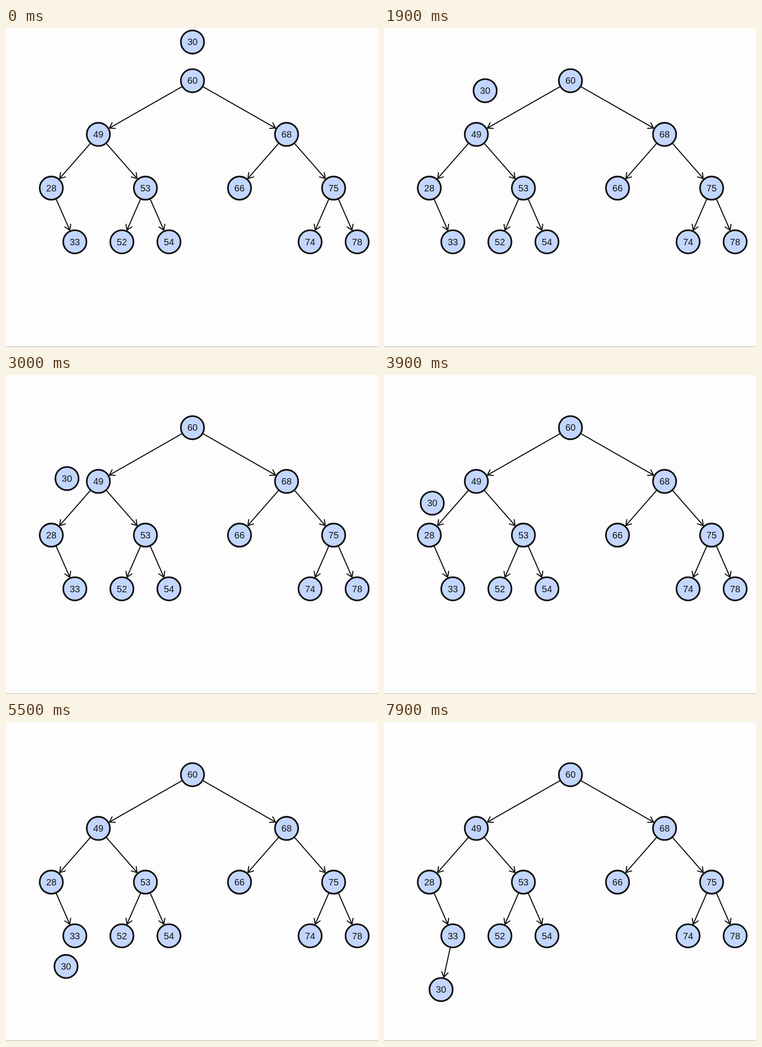
Write an HTML page with a canvas that moves like this. It is 808 px wide and 693 px high and loops after 8000 ms.

```html
<!DOCTYPE html>
<html lang="en">
<head>
<meta charset="utf-8">
<title>Tree insertion</title>
<style>
  html, body { margin: 0; width: 100%; height: 100%; overflow: hidden; background: #fdfdfd; }
  canvas { display: block; }
</style>
</head>
<body>
<canvas id="stage" width="808" height="693"></canvas>
<script>
const ctx = document.getElementById('stage').getContext('2d');
const INK = '#131313', FILL = '#c3d6fe', FONT = '"Liberation Sans", Arial, sans-serif';
const RADIUS = 25.2, LOOP = 8000, TICK = 100, MOVE = 600, LIFT = 84;

// Tree cells: column offset from the root and depth
const at = (col, depth) => ({ x: 405 + col * 51.1, y: 114.4 + depth * 116.7 });
const nodes = {
  60: at(0, 0), 49: at(-4, 1), 68: at(4, 1),
  28: at(-6, 2), 53: at(-2, 2), 66: at(2, 2), 75: at(6, 2),
  33: at(-5, 3), 52: at(-3, 3), 54: at(-1, 3), 74: at(5, 3), 78: at(7, 3)
};
const edges = [[60, 49], [60, 68], [49, 28], [49, 53], [68, 66], [68, 75],
  [28, 33], [53, 52], [53, 54], [75, 74], [75, 78]];

const key = 30, leaf = at(-5.5, 4);
const visits = [60, 49, 28, 33];
const starts = [1356, 2600, 3825, 5050];
const linkTime = 5750;
const above = p => ({ x: p.x, y: p.y - LIFT });
const stops = [...visits.map(v => above(nodes[v])), leaf];

function text(str, x, y, size) {
  ctx.font = size + 'px ' + FONT;
  ctx.textAlign = 'center';
  ctx.fillStyle = INK;
  ctx.fillText(str, x, y);
}

function drawNode(value, { x, y }) {
  ctx.beginPath();
  ctx.arc(x, y, RADIUS, 0, Math.PI * 2);
  ctx.fillStyle = FILL;
  ctx.fill();
  ctx.lineWidth = 3.6;
  ctx.stroke();
  text(value, x, y + 7, 20);
}

function drawEdge(a, b) {
  const back = Math.atan2(a.y - b.y, a.x - b.x);
  const polar = (p, r, angle) => [p.x + r * Math.cos(angle), p.y + r * Math.sin(angle)];
  const [x, y] = polar(b, 27.5, back), tip = { x, y };
  ctx.lineWidth = 2.3;
  ctx.beginPath();
  ctx.moveTo(a.x, a.y);
  ctx.lineTo(x, y);
  ctx.moveTo(...polar(tip, 13, back - 0.57));
  ctx.lineTo(x, y);
  ctx.lineTo(...polar(tip, 13, back + 0.57));
  ctx.stroke();
}

function drawSign(sign, { x, y }) {
  ctx.beginPath();
  ctx.roundRect(x - 8, y - 8, 16, 16, 3);
  ctx.fillStyle = FILL;
  ctx.fill();
  ctx.lineWidth = 1.6;
  ctx.stroke();
  text(sign, x, y + 4.3, 12);
}

function keyPosition(t) {
  let p = stops[0];
  starts.forEach((start, i) => {
    if (t < start) return;
    const k = Math.min(1, (t - start) / MOVE), a = stops[i], b = stops[i + 1];
    p = { x: a.x + (b.x - a.x) * k, y: a.y + (b.y - a.y) * k };
  });
  return p;
}

function draw(t) {
  ctx.fillStyle = '#fdfdfd';
  ctx.fillRect(0, 0, 808, 693);
  ctx.fillStyle = '#a9a698';
  ctx.fillRect(0, 692, 808, 1);
  ctx.strokeStyle = INK;
  ctx.lineCap = ctx.lineJoin = 'round';

  edges.forEach(([a, b]) => drawEdge(nodes[a], nodes[b]));
  if (t >= linkTime) drawEdge(nodes[33], leaf);
  for (const value in nodes) drawNode(value, nodes[value]);
  drawNode(key, keyPosition(t));

  // The comparison shows while the key rests above a node
  visits.forEach((v, i) => {
    const wait = starts[i] - t;
    if (wait > 190 && wait < 630) {
      drawSign(key < v ? '<' : '>', { x: nodes[v].x, y: nodes[v].y - LIFT / 2 });
    }
  });
}

const begin = performance.now();
function frame() {
  const t = (performance.now() - begin) % LOOP;
  draw(Math.floor(t / TICK) * TICK);
  requestAnimationFrame(frame);
}
frame();
</script>
</body>
</html>
```
